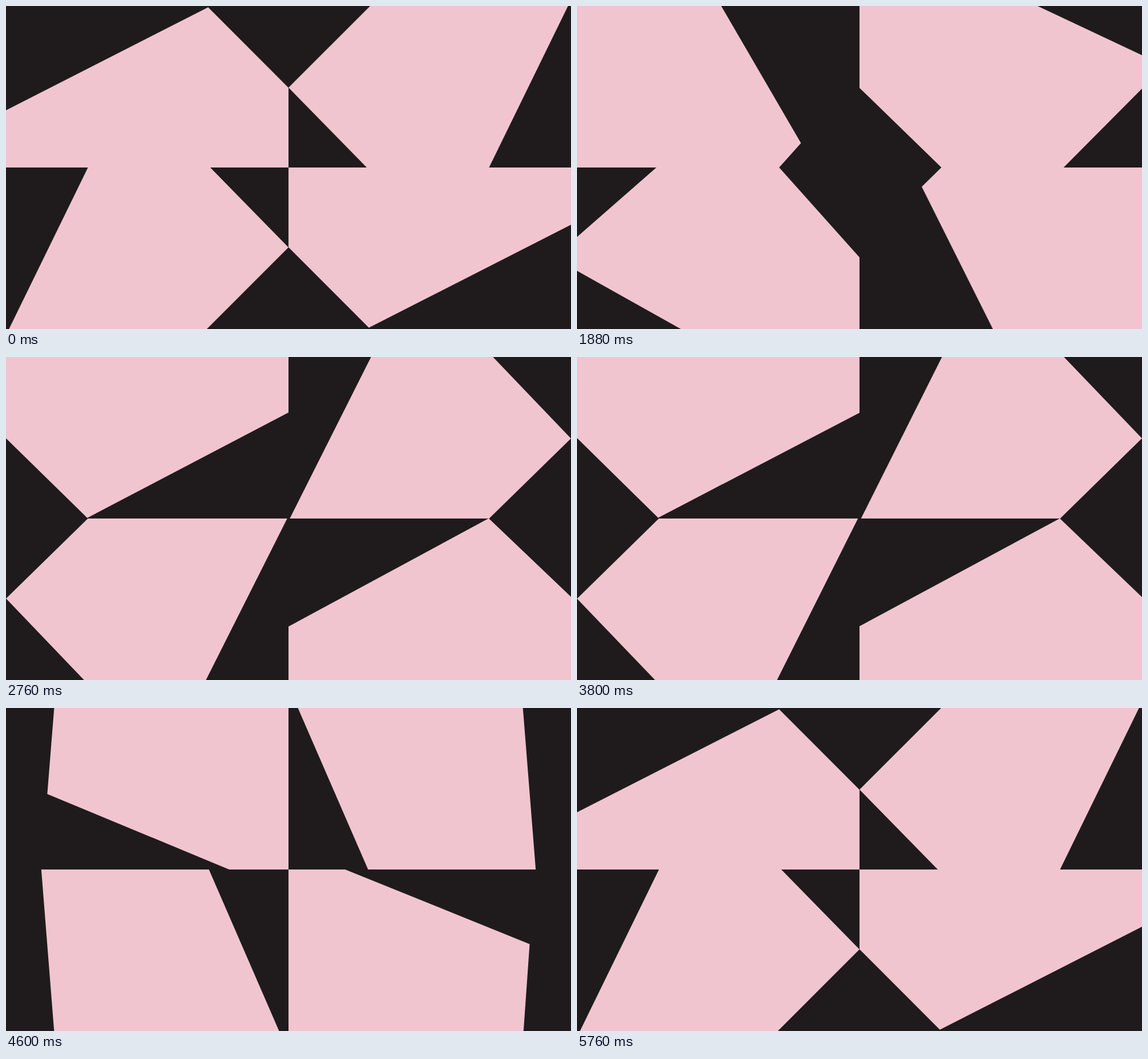
An HTML page for the animation above (5800 ms loop, 990x566 px).

```html
<!DOCTYPE html>
<html lang="en">
<head>
<meta charset="utf-8">
<title>Turning tiles</title>
<style>
  html, body { margin: 0; width: 100%; height: 100%; overflow: hidden; background: #1f1b1c; }
  #stage { display: block; width: 990px; height: 566px; }
  #stage svg { overflow: hidden; }
  polygon { fill: #f0c5cf; }
</style>
</head>
<body>
<svg id="stage" viewBox="0 0 990 566"></svg>
<script>
const NS = 'http://www.w3.org/2000/svg';
const W = 495, H = 283, LOOP = 5800, FRAME = 40;

// Shapes around the tile centre; far corners lie outside the tile
const WEDGE = '106.7,-139.2 1106.7,862.2 -1867.3,866';
const KITE = '-247.4,1.5 32.5,287.5 574,-820';

// spin: turning direction, base: resting angle, half: angle held mid-loop
const tiles = [
  { col: 0, row: 0, shape: WEDGE, spin: 1, base: 0, half: 179.35, start: 1020, time: 1735 },
  { col: 1, row: 0, shape: KITE, spin: -1, base: 0, half: 179.35, start: 990, time: 1774 },
  { col: 0, row: 1, shape: KITE, spin: -1, base: 180, half: 179.35, start: 1020, time: 1735 },
  { col: 1, row: 1, shape: WEDGE, spin: 1, base: 180, half: 178.6, start: 990, time: 1774 }
];

function add(parent, tag, attrs) {
  const el = document.createElementNS(NS, tag);
  for (const key in attrs) el.setAttribute(key, attrs[key]);
  return parent.appendChild(el);
}

// Symmetric cubic bezier easing (a, 0, 1 - a, 1)
function ease(x, a) {
  if (x <= 0) return 0;
  if (x >= 1) return 1;
  let lo = 0, hi = 1, s;
  for (let i = 0; i < 30; i++) {
    s = (lo + hi) / 2;
    const r = 1 - s;
    if (3 * a * s * r * r + 3 * (1 - a) * s * s * r + s * s * s < x) lo = s;
    else hi = s;
  }
  return s * s * (3 - 2 * s);
}

function angle(tile, t) {
  const first = ease((t - tile.start) / tile.time, 0.73);
  const second = ease((t - 3745) / 2000, 0.72);
  return tile.base + tile.spin * (tile.half * first + (360 - tile.half) * second);
}

const stage = document.getElementById('stage');
for (const tile of tiles) {
  const cell = add(stage, 'svg', {
    x: tile.col * W, y: tile.row * H, width: W, height: H,
    viewBox: `${-W / 2} ${-H / 2} ${W} ${H}`
  });
  tile.el = add(cell, 'polygon', { points: tile.shape });
}

function draw() {
  const t = Math.floor(performance.now() % LOOP / FRAME) * FRAME;
  for (const tile of tiles) tile.el.setAttribute('transform', `rotate(${angle(tile, t)})`);
  requestAnimationFrame(draw);
}
draw();
</script>
</body>
</html>
```
